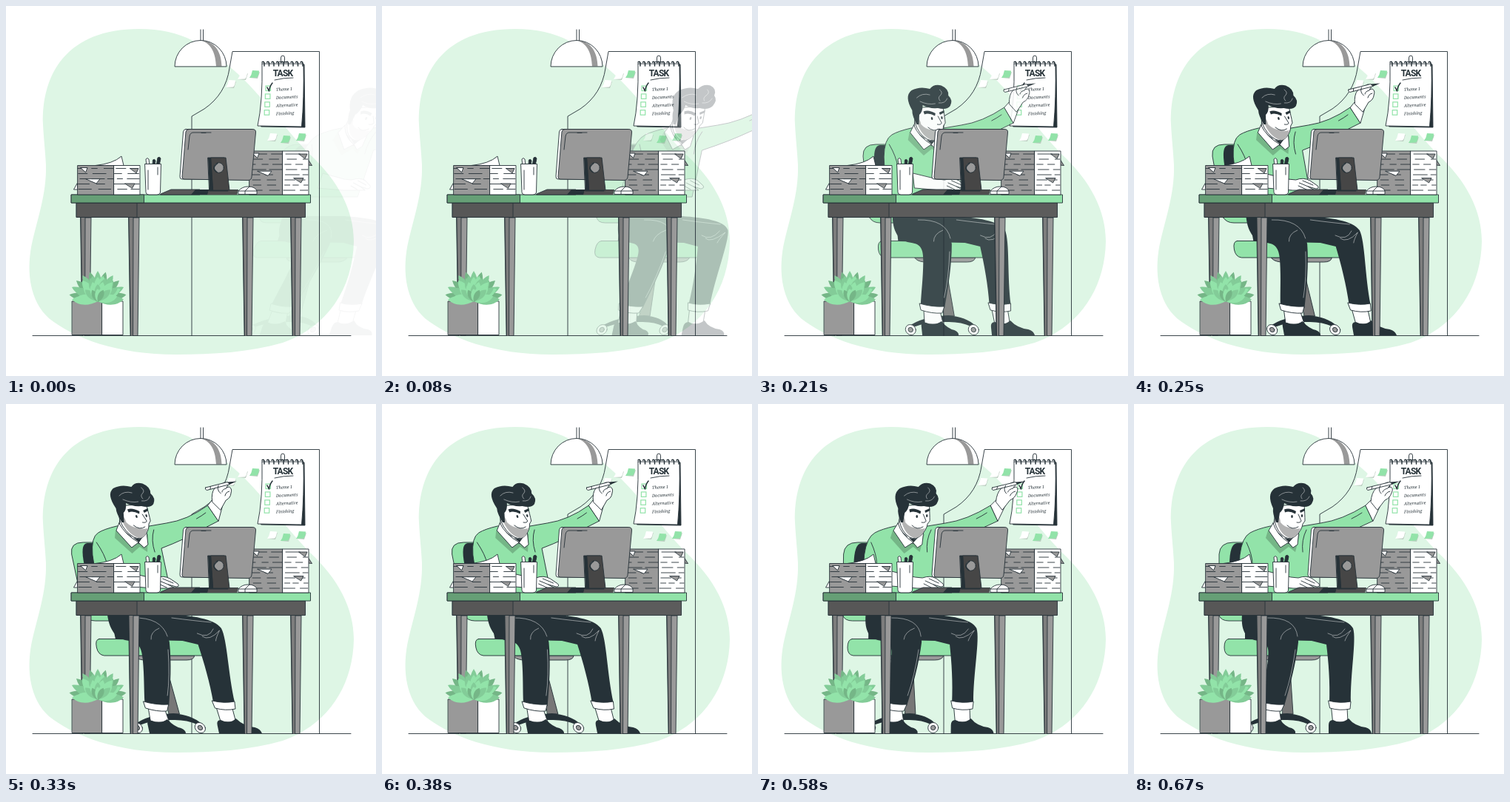
Write an HTML page that moves like this. It is 500 px wide and 500 px high and loops after 710 ms.

```html
<!DOCTYPE html>
<html lang="en">
<head>
<meta charset="utf-8">
<title>Task desk</title>
<style>
  html, body { margin: 0; width: 100%; height: 100%; overflow: hidden; background: #fff; }
  svg { display: block; width: 100vw; height: 100vh; }
  .o { stroke: #263238; stroke-width: .9; stroke-linejoin: round; stroke-linecap: round; }
  .l { fill: none; stroke: #263238; stroke-width: .9; stroke-linecap: round; stroke-linejoin: round; }
  .b { stroke-width: 1.5; }
  .h { fill: none; stroke: #fff; stroke-width: .6; stroke-linecap: round; opacity: .75; }
  .w { fill: #fff; }
  .g { fill: #92e3a9; }
  .m { fill: #83cc98; }
  .s { fill: #75b687; }
  .n { fill: #999; }
  .d { fill: #263238; }
  .title { font: 700 12px Roboto, sans-serif; font-stretch: 75%; letter-spacing: -.8px; fill: #263238; text-anchor: middle; }
  .note { font: italic 5.7px "Noto Serif", cursive; fill: #263238; }
</style>
</head>
<body>
<svg viewBox="0 0 500 500">
  <path fill="#def6e5" d="M50 160C48 92 82 31 180 31C238 31 272 54 308 87C346 120 374 163 410 200C449 236 470 276 470 318C469 382 434 434 374 455C328 468 280 471 230 471C150 471 92 449 58 422C32 398 28 360 34 326C42 288 55 255 54 215C53 195 51 180 50 160Z"/>
  <path class="l" d="M36 445.5H466M251 445.5V149L268 139Q297 119 302 84L306 61.5H423.5V445.5"/>

  <g id="lamp">
    <path class="l" d="M263 32V47M266.500 32V47"/>
    <path class="w" d="M228 81.500A35 35 0 0 1 298 81.500Z"/>
    <path class="n" d="M264 46.500C284 48 291 64 291.500 81.500H284C283 65 279 52 264 46.500Z"/>
    <path class="l" d="M228 81.500A35 35 0 0 1 298 81.500Z"/>
  </g>

  <g id="notes"></g>
  <g id="pad">
    <path class="o d" d="M348 79L403 79L404 164L345 163Z"/>
    <path class="o w" d="M346 78L402 78Q403 125 399.500 163L340 162Q347 130 346 78Z"/>
    <g id="rings"></g>
    <path class="l" d="M371.500 77V70Q371.500 67 374 67T376.500 70V77M369 75.500H379"/>
    <text class="title" x="374" y="95">TASK</text>
    <path class="l" d="M363 100Q375 97 388 97"/>
    <g id="items"></g>
    <path class="l b" d="M353 110L355.500 115Q356 109 360 104"/>
  </g>

  <g id="man">
    <!-- chair -->
    <path class="o g" d="M115 286V203Q116 187 134 187H152V293H128Q118 293 115 286Z"/>
    <path class="d" d="M129 218Q129 189 139 188H152L146 218Z"/>
    <path class="o" fill="#777" d="M203 343H210L215 419H201Z"/>
    <path class="o n" d="M170 340H252Q250 346 240 346H182Q172 345 170 340Z"/>
    <path class="o g" d="M128 317.500H268V340H130Q122 339 122 329Q122 318 128 317.500Z"/>
    <path class="d" d="M152 433Q170 420 207 418Q231 420 242 432L236 433Q224 427 207 427Q178 426 158 434Z"/>
    <g class="o w"><circle cx="154" cy="437.500" r="7"/><circle cx="239" cy="437.500" r="7"/></g>
    <g class="o n"><circle cx="154" cy="437.500" r="3.200"/><circle cx="239" cy="437.500" r="3.200"/></g>
    <!-- legs -->
    <path class="o w" d="M267 410H288L289 430H269Z"/>
    <path class="d" d="M263 445V434Q263 427 269 427Q280 433 290 425Q298 435 313 437Q320 439 321 445Z"/>
    <path class="d" d="M150 284H230C260 286 289 290 296 303C301 318 292 366 293 404L264 404C265 376 263 350 260 325L240 320L150 318Z"/>
    <path class="o w" d="M263 401Q278 405 293 402L292 412Q278 415 265 411Z"/>
    <path class="o w" d="M175 410H196L199 430H174Z"/>
    <path class="d" d="M169 445V432Q170 426 176 428Q186 433 197 426Q204 436 213 438Q219 441 218 445Z"/>
    <path class="d" d="M146 284C144 309 153 318 168 320C180 322 183 328 181 345C178 370 174 385 171 405L203 408C211 380 219 350 222 322C223 300 205 288 185 284Z"/>
    <path class="o w" d="M170 402Q186 407 203 406L199 415Q185 416 171 411Z"/>
    <path class="h" d="M180 289Q218 288 221 314M218 332Q213 368 204 394M262 310Q276 318 285 304M268 314Q276 321 293 306Q286 316 285 320M232 289Q262 293 284 295M212 303Q199 308 198 318"/>
    <!-- body and raised arm -->
    <path class="o g" d="M184 165Q166 169 157 174Q146 180 143 204L140 258H238V195Q272 183 297 170L323 158L313 137Q281 157 252 161L222 166Z"/>
    <path class="s" d="M181 171L178 181L197 202L209 193L218 200L224 176Z"/>
    <path class="l" d="M152 187Q160 204 160 216M233 170Q226 184 228 200M308 147Q302 151 294 155"/>
    <path class="o w" d="M313 137L320 130L333 137L323 158Z"/>
    <path class="o w" d="M320 132Q321 120 327 114L334 110L342 106Q347 106 346 110L343 113L347 112Q351 114 348 120Q346 127 339 130L329 143Z"/>
    <path class="o w" d="M315 113L346 105.500L349 108.500L316 116.500Q313 115.500 315 113Z"/>
    <path class="d" d="M346 105.500L359 104.500L349 108.500Z"/>
    <path class="l" d="M333 110Q329 116 334 121M343 114Q337 115 336 119M346 118Q341 119 339 124M321 115L322 111.500"/>
    <!-- resting hand -->
    <path class="o w" d="M180 226L212 234L222 235Q233 231 241 236L250 243Q252 247 247 247L237 244L245 249H215L180 246Z"/>
    <path class="l" d="M226 239L237 244M231 236L244 242M224 243L234 248"/>
    <!-- neck, collar, head -->
    <path class="o w" d="M190 155L187 169L209 189L217 175Z"/>
    <path class="d" d="M191 170Q202 186 217 181L211 188Z"/>
    <path class="o w" d="M188 161L182 171L198 194L209 187Q193 177 188 161Z"/>
    <path class="o w" d="M209 187L218 177L223 170L221 190L215 194Z"/>
    <g transform="translate(-1 0)">
      <path class="o w" d="M191 138V158Q194 173 205 180Q213 184 220 178Q228 170 229 162L232 158Q232 150 231 136Z"/>
      <path fill="#b3b3b3" d="M192 148Q198 150 199 160Q204 166 211 167Q220 170 226 168Q221 182 211 181Q195 175 192 148Z"/>
      <path class="d" d="M193 160Q188 148 189 141Q180 122 191 114Q203 108 216 112Q222 105 232 107.500Q242 112 240 121Q246 127 241 135Q236 141 224 138Q212 139 204 134Q203 143 198 147L196 160Z"/>
      <path class="h" d="M197 124Q205 117 215 120M229 113Q234 117 229 121Q225 124 228 128M238 125Q235 132 226 131M201 129Q211 134 221 132"/>
      <path class="d" d="M204 142.500Q211 139.500 220 145L219 148.500Q211 144 205 146.500ZM225 144L232 141V144L226 147Z"/>
      <ellipse class="d" cx="214.500" cy="152" rx="1.300" ry="2"/><ellipse class="d" cx="228" cy="151" rx="1.200" ry="2"/>
      <path class="l" d="M223 149L227 158Q226 161 221 160M208 164Q215 171 223 166"/>
    </g>
  </g>

  <g id="desk"></g>

  <g id="cup">
    <path class="o w" d="M190 216L189 207Q191 204 193 207L194 216Z"/>
    <path class="o d" d="M198 216L198.500 208Q201 206 202 209L201 216ZM203 216L205 205Q208 203 209 206L207 216Z"/>
    <path class="o w" d="M188 213.500H209.500L208.500 252Q208 255 204 255H193Q189 255 189 252Z"/>
    <path class="l" d="M192 222V248M205 218V228"/>
  </g>
  <g id="screen">
    <path class="o" fill="#595959" d="M209 254L223 248H262V255H209Z"/>
    <path class="d" d="M256 248H314L312 255H250Z"/>
    <path fill="#4f4f4f" d="M274 248.500H313.500L312 255H272Z"/>
    <path class="o w" d="M243 166.500L332 166.500L329 235L238 234Q234.500 234 235 230L239.500 170Q240 166.500 243 166.500Z"/>
    <path class="o n" d="M247 166.500H333Q338 166.500 337.500 171L332 231Q331.500 235.500 327 235.500L241 234Q238 234 238 231L243 170Q243.500 166.500 247 166.500Z"/>
    <path class="l" d="M277 171H253Q249 171 248 176L246 194M270 171.500H264"/>
    <path class="o d" d="M273 205H295L300 250H275Z"/>
    <path class="o" fill="#464646" d="M277 205H297L302 249H280Z"/>
    <circle class="o n" cx="287.500" cy="218.500" r="6.800"/>
    <path class="l b" d="M286 212.500Q277 219 285 224.500"/>
    <path class="o w" d="M314 254V250Q319 244 327 244Q337 244 339 250V254ZM314 250H339M323 254V250L329 244"/>
  </g>
  <g id="plant"></g>
</svg>
<script>
const $ = id => document.getElementById(id);
const path = (cls, d, more = "") => `<path class="${cls}" d="${d}" ${more}/>`;
const rect = (cls, x, y, w, h, more = "") =>
  `<rect class="${cls}" x="${x}" y="${y}" width="${w}" height="${h}" ${more}/>`;

let seed = 11;
const rnd = () => (seed = seed * 16807 % 2147483647) / 2147483647;

// Sticky notes: x, y, green?
$("notes").innerHTML = [[303, 105], [319, 94], [335, 92, 1], [359, 177], [377, 180, 1], [398, 177, 1]]
  .map(([x, y, green]) =>
    path("", `M${x - 6} ${y + 5}l11 1 3 -9z`, 'fill="#bccdc1"') +
    path(green ? "g" : "w", `M${x - 2} ${y - 5}l9 .5q0 6 -3 9l-10 .5q3 -4 4 -10z`)).join("");

$("rings").innerHTML = Array.from({ length: 9 }, (_, i) =>
  path("l b", `M${349 + i * 6.5} 81v-4q-1 -3 -3 -1`)).join("");

$("items").innerHTML = ["Theme 1", "Documents", "Alternative", "Finishing"].map((t, i) => {
  const y = 115 + i * 10.9;
  return rect("", 351 - i * .6, y - 7, 6.5, 6.5, 'fill="none" stroke="#92e3a9" stroke-width="1.2"') +
    `<text class="note" x="365" y="${y}" transform="rotate(-3 365 ${y})">${t}</text>`;
}).join("");

// A pile of sheets with a shaded side and a lit side
function pile(x, mid, end, top, bottom) {
  let s = rect("o n", x, top, mid - x, bottom - top) + rect("o w", mid, top, end - mid, bottom - top);
  let d = "";
  for (let y = top + 4; y < bottom - 2; y += 7)
    for (const [a, b] of [[x, mid], [mid, end]])
      for (let p = a + rnd() * 6; p < b - 5;) {
        const q = Math.min(b - 1, p + 7 + rnd() * 13);
        d += `M${p.toFixed(1)} ${y}H${q.toFixed(1)}`;
        p = q + 4 + rnd() * 6;
      }
  s += path("l", d);
  const flap = (cls, px, py, w) => path("o " + cls, `M${px} ${py}h${w}l${-w * .25} 6z`);
  s += flap("w", x + 11, top + (bottom - top) * .46, 19) + flap("w", x + 4, top + 3, 9);
  s += flap("n", mid + 15, top + (bottom - top) * .62, 13) + flap("n", end - 13, top + 4, 11);
  return s;
}

const leg = (x, top = 286) =>
  path("o n", `M${x} ${top}h14l-2 159.500h-9.500z`) +
  path("", `M${x} ${top}h6l-.5 159.500h-3z`, 'fill="#7d7d7d"') +
  path("l", `M${x} ${top}l2.500 159.500M${x + 6} ${top}l-.5 159.500`);

$("desk").innerHTML =
  [101, 166, 320, 385].map(x => leg(x)).join("") +
  rect("o", 95.5, 266, 309, 19.5, 'fill="#5c5c5c"') +
  rect("o", 95.5, 266, 81.5, 19.5, 'fill="#575757"') +
  rect("o g", 88.5, 255, 323, 11) +
  rect("o", 88.5, 255, 98, 11, 'fill="#669f76"') +
  path("o w", "M96 240L91.500 248H97Z") +
  path("o w", "M121 215.500Q145 213 156 203L159 215.500Z") +
  pile(97, 146, 181, 215.5, 255) +
  path("o n", "M408 207L413.500 215.500L408 215Z") +
  path("o w", "M329 222L324 235H331Z") +
  pile(329, 374, 409, 196, 255);

// Succulent: rings of pointed leaves fanning from one root
function leaves(n, spread, len, width, cls, y) {
  let s = "";
  for (let i = 0; i < n; i++) {
    const a = (i / (n - 1) * 2 - 1) * spread;
    s += path(cls[i % cls.length], `M0 0C${-width} ${-len * .35} ${-width} ${-len * .75} 0 ${-len}C${width} ${-len * .75} ${width} ${-len * .35} 0 0Z`,
      `transform="translate(124 ${y}) rotate(${a})"`);
  }
  return s;
}
$("plant").innerHTML =
  rect("o n", 89.5, 399, 40.5, 45.5) + rect("o w", 130, 399, 28, 45.5) +
  leaves(11, 80, 39, 7, ["s", "m"], 397) +
  leaves(8, 86, 35, 8, ["g", "m"], 399) +
  leaves(7, 60, 31, 7, ["m", "g"], 397) +
  leaves(6, 76, 27, 7, ["g"], 399) +
  leaves(5, 48, 23, 6, ["m", "g"], 399) +
  leaves(3, 25, 18, 5, ["s", "g"], 400);

// The man rushes in, leans past his place and settles
function ease(x) {
  const bez = (u, a, b) => 3 * (1 - u) ** 2 * u * a + 3 * (1 - u) * u * u * b + u ** 3;
  let lo = 0, hi = 1;
  for (let i = 0; i < 30; i++) {
    const u = (lo + hi) / 2;
    if (bez(u, .36, .5) < x) lo = u; else hi = u;
  }
  return bez(lo, -.01, 1.38);
}

const LOOP = 710, STEPS = 17;
const starts = Array.from({ length: STEPS }, (_, i) => Math.round(i * LOOP / STEPS / 10) * 10);
const clock = [[0, .065], [3, .213], [6, .41], [9, .557], [11, .691], [14, .89], [16, 1]];

function progress(step) {
  const k = Math.max(1, clock.findIndex(c => c[0] >= step));
  const [a, p] = clock[k - 1], [b, q] = clock[k];
  return p + (q - p) * (step - a) / (b - a);
}

function pose(step) {
  const f = progress(step);
  let shift = 0, lean, alpha = 1;
  if (f < .6) {
    const p = ease(f / .6);
    shift = 250 * (1 - p);
    lean = -20 + 30 * p;
    alpha = Math.max(0, Math.min(1, p));
  } else if (f < .8) lean = 10 - 12 * ease((f - .6) / .2);
  else lean = -2 + 2 * ease((f - .8) / .2);
  return { shift, lean, alpha };
}

const poses = starts.map((_, i) => pose(i));
const man = $("man");
function draw() {
  const t = performance.now() % LOOP;
  const { shift, lean, alpha } = poses[starts.filter(s => s <= t).length - 1];
  man.setAttribute("transform", `translate(${shift} 250) skewX(${lean}) translate(0 -250)`);
  man.setAttribute("opacity", alpha);
  requestAnimationFrame(draw);
}
draw();
</script>
</body>
</html>
```
